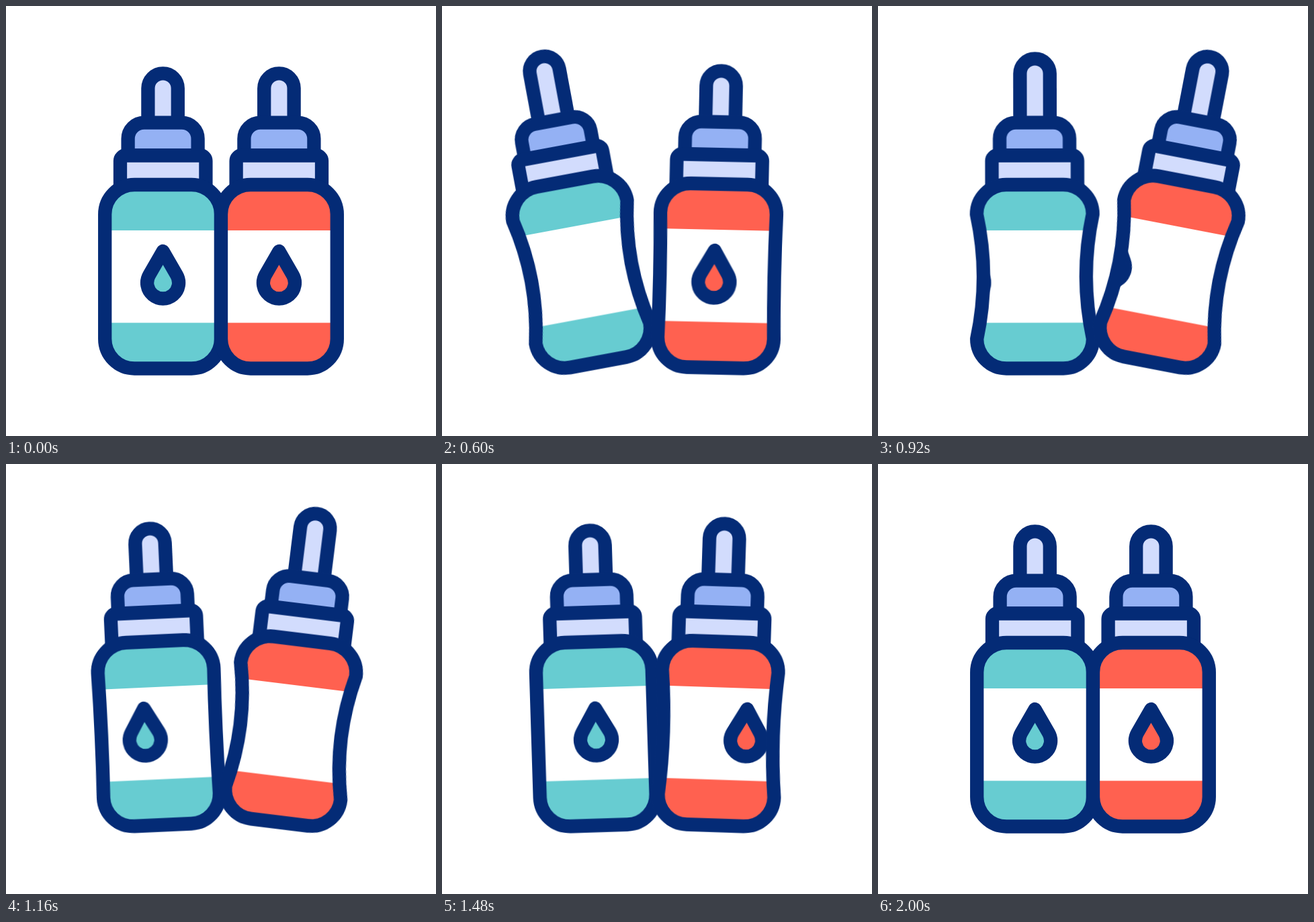
Write an HTML page without scripts that moves like this. It is 640 by 640 pixels and loops after 2040 ms.

```html
<!DOCTYPE html>
<html lang="en">
<head>
<meta charset="utf-8">
<title>Dropper bottles</title>
<style>
  html, body { margin: 0; width: 100%; height: 100%; overflow: hidden; background: #fff; }
  svg { display: block; width: 100vw; height: 100vh; }

  .left { --wait: 95ms; --ink: #67ccd1; }
  .right { --wait: 510ms; --ink: #ff6150; }

  .line { stroke: #042b76; stroke-width: 20.3; stroke-linejoin: round; }
  .ink { fill: var(--ink); }

  .bottle, .body, .tip, .drop { animation: 2040ms linear var(--wait) infinite; }
  .bottle { animation-name: tilt; transform-origin: 183px 541px; }
  .tip { animation-name: rise; }
  .drop { animation-name: slide; }
  .body {
    animation-name: squeeze;
    d: path("M147.2 310A44 44 0 0 1 191.2 266H276A44 44 0 0 1 320 310Q320 402.5 320 495.5A44 44 0 0 1 276 539.5H191.2A44 44 0 0 1 147.2 495.5Q147.2 402.5 147.2 310Z");
  }

  /* tip over, fall back, bounce once */
  @keyframes tilt {
    0% { transform: rotate(0deg); animation-timing-function: cubic-bezier(.33, 0, .67, 1); }
    21.3% { transform: rotate(-11deg); animation-timing-function: cubic-bezier(.33, 0, .65, .42); }
    40.2% { transform: rotate(0deg); animation-timing-function: cubic-bezier(.33, .67, .67, 1); }
    59.07% { transform: rotate(-3deg); animation-timing-function: cubic-bezier(.33, 0, .67, .33); }
    73.04%, 100% { transform: rotate(0deg); }
  }
  @keyframes rise {
    0% { transform: translate(0, 0); animation-timing-function: cubic-bezier(.33, 0, .67, 1); }
    21.08% { transform: translate(.7px, -23.5px); }
    37.5% { transform: translate(.7px, -23.5px); animation-timing-function: cubic-bezier(.33, 0, .67, 1); }
    55.88%, 100% { transform: translate(0, 0); }
  }
  @keyframes squeeze {
    0%, 55.88%, 100% {
      d: path("M147.2 310A44 44 0 0 1 191.2 266H276A44 44 0 0 1 320 310Q320 402.5 320 495.5A44 44 0 0 1 276 539.5H191.2A44 44 0 0 1 147.2 495.5Q147.2 402.5 147.2 310Z");
      animation-timing-function: cubic-bezier(.33, 0, .67, 1);
    }
    21.08%, 37.5% {
      d: path("M147.2 310A44 44 0 0 1 191.2 266H276A44 44 0 0 1 320 310Q298.5 402.5 320 495.5A44 44 0 0 1 276 539.5H191.2A44 44 0 0 1 147.2 495.5Q168.7 402.5 147.2 310Z");
      animation-timing-function: cubic-bezier(.33, 0, .67, 1);
    }
  }
  /* leaves on one side, comes back on the other */
  @keyframes slide {
    0% { transform: translateX(0); animation-timing-function: cubic-bezier(.33, 0, .67, .33); }
    22.06% { transform: translateX(107px); animation-timing-function: step-end; }
    39.7% { transform: translateX(-107px); animation-timing-function: cubic-bezier(.33, 1, .67, 1); }
    69.3%, 100% { transform: translateX(0); }
  }
</style>
</head>
<body>
<svg viewBox="0 0 640 640">
  <defs>
    <path id="tip" class="line" fill="#d2dcfd" d="M211.4 206V122.6a22.2 22.2 0 0 1 44.4 0V206"/>
    <g id="cap" class="line">
      <path fill="#94b1f4" d="M181.6 222.5V197.6a24 24 0 0 1 24-24h56a24 24 0 0 1 24 24V222.5Z"/>
      <path fill="#d2dcfd" d="M170 275V230.5a8 8 0 0 1 8-8h111.4a8 8 0 0 1 8 8V275Z"/>
    </g>
    <path id="drop" class="line ink" d="M233.6 365L213.25 400.25A23.5 23.5 0 1 0 253.95 400.25Z"/>
    <path id="label" fill="#fff" d="M100 334H370V471.5H100Z"/>
    <clipPath id="clipL" class="left"><path class="body"/></clipPath>
    <clipPath id="clipR" class="right"><path class="body"/></clipPath>
  </defs>

  <g class="left">
    <g class="bottle">
      <g class="tip"><use href="#tip"/></g>
      <use href="#cap"/>
      <g clip-path="url(#clipL)">
        <path class="body ink"/>
        <use href="#label"/>
        <g class="drop"><use href="#drop"/></g>
      </g>
      <path class="body line" fill="none"/>
    </g>
  </g>

  <g class="right" transform="translate(640) scale(-1 1)">
    <g class="bottle">
      <g class="tip"><use href="#tip"/></g>
      <use href="#cap"/>
      <g clip-path="url(#clipR)">
        <path class="body ink"/>
        <use href="#label"/>
        <g class="drop"><use href="#drop"/></g>
      </g>
      <path class="body line" fill="none"/>
    </g>
  </g>
</svg>
</body>
</html>
```
